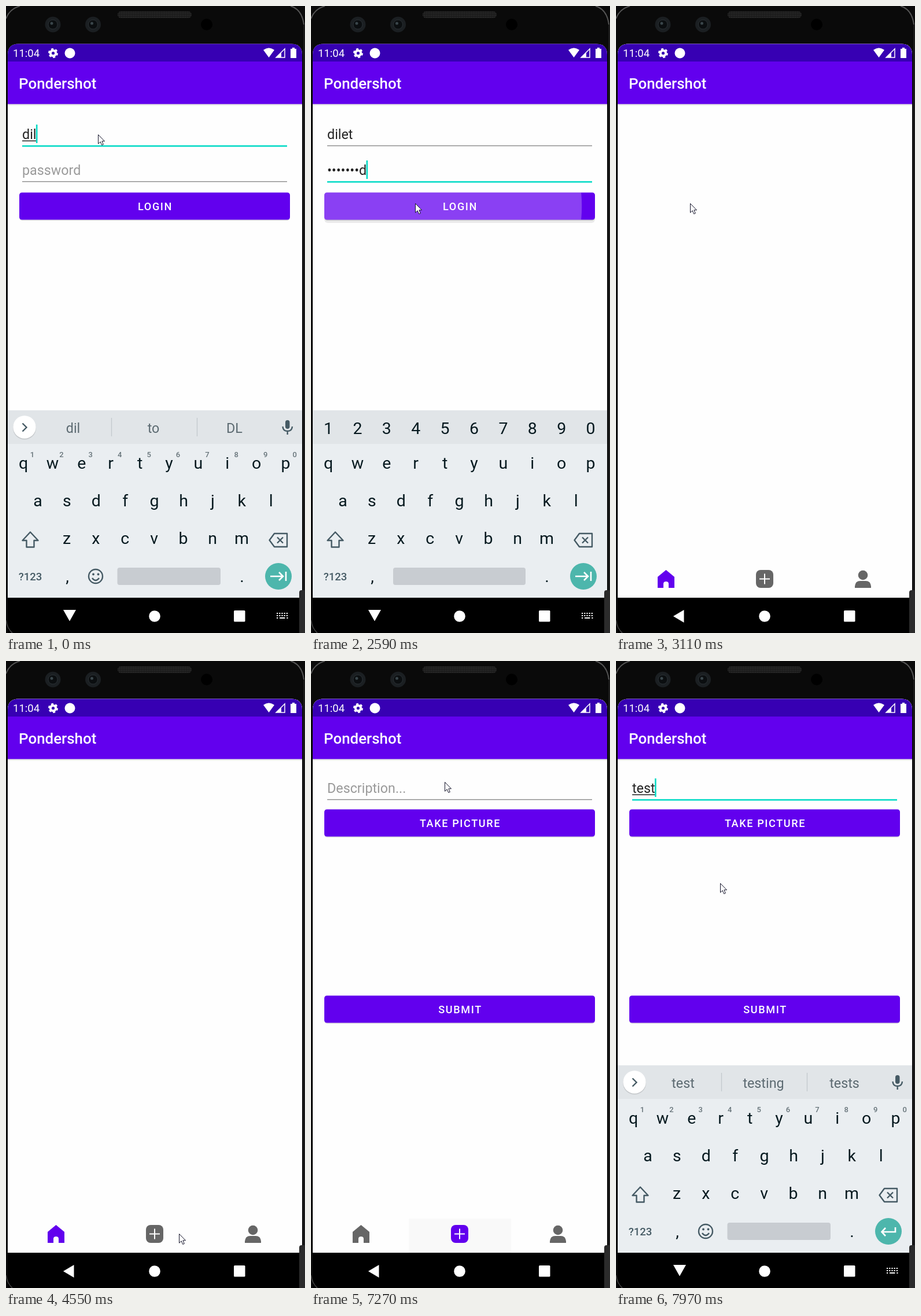
An HTML page for the animation above (8 s loop, 517 px wide and 1084 px high).

```html
<!DOCTYPE html>
<html lang="en">
<head>
<meta charset="utf-8">
<title>Phone app demo</title>
<style>
  html, body { margin: 0; width: 100%; height: 100%; overflow: hidden; background: #0a0a0a; }
  svg { display: block; width: 517px; height: 1084px; font-family: Roboto, sans-serif; }
  .mid { text-anchor: middle; }
  .btn { font-size: 18.1px; font-weight: 500; letter-spacing: 1.62px; fill: #fff; text-anchor: middle; }
  .field { font-size: 23.3px; }
  .key { font-size: 28.5px; fill: #06191f; text-anchor: middle; }
  .num { font-size: 13px; font-weight: 500; fill: #67747a; text-anchor: middle; }
  .sug { font-size: 23.3px; fill: #5c6a71; text-anchor: middle; }
  .line { fill: none; stroke: #455a64; stroke-width: 2.4; }
  .white { fill: none; stroke: #fff; stroke-width: 2.6; }
</style>
</head>
<body>
<svg viewBox="0 0 517 1084">
  <defs>
    <clipPath id="screen"><path d="M3 1084V84Q3 65.500 22 65.500H493Q512 65.500 512 84V1084Z"/></clipPath>
    <clipPath id="aboveNav"><path d="M3 65H512V1023H3Z"/></clipPath>
    <clipPath id="loginClip"><rect x="23" y="322.500" width="468" height="47" rx="4.500"/></clipPath>
    <clipPath id="tabClip"><path d="M169 964H346V1023H169Z"/></clipPath>
    <pattern id="mesh" width="3" height="3" patternUnits="userSpaceOnUse">
      <rect width="3" height="3" fill="#191919"/><circle cx="1.5" cy="1.5" r=".8" fill="#3a3a3a"/>
    </pattern>
    <linearGradient id="shade" x2="0" y2="1">
      <stop stop-color="#000" stop-opacity=".16"/><stop offset="1" stop-color="#000" stop-opacity="0"/>
    </linearGradient>
    <g id="header">
      <path d="M3 65H512V1023H3Z" fill="#fefefe"/>
      <path d="M3 169H512V173H3Z" fill="url(#shade)"/>
      <path d="M3 96H512V169.500H3Z" fill="#6200ee"/>
      <text x="22" y="143" font-size="25.9" font-weight="500" fill="#fff">Pondershot</text>
    </g>
  </defs>

  <!-- phone body -->
  <g fill="none" stroke="#555" stroke-width="2">
    <path d="M0 22Q6 5 24 0M492 0Q512 6 515 32"/>
    <path d="M515.5 32V1084" stroke="#222"/>
  </g>
  <rect x="193" y="9" width="128" height="12" rx="6" fill="url(#mesh)"/>
  <g id="cameras"></g>
  <circle cx="347" cy="32" r="10" fill="#000"/>

  <g clip-path="url(#screen)">
    <path d="M3 65H512V1084H3Z"/>
    <g clip-path="url(#aboveNav)">
      <g id="login">
        <use href="#header"/>
        <g id="user" class="field" transform="translate(28 230)"></g>
        <g id="pass" class="field" transform="translate(28 292)"></g>
        <rect id="lift" x="23" y="326" width="468" height="49" rx="6" fill="#000" opacity="0"/>
        <g id="loginButton"></g>
        <g clip-path="url(#loginClip)"><circle id="ripple" cx="182" cy="346" fill="#fff"/></g>
        <text class="btn" x="258" y="353">LOGIN</text>
      </g>
      <g id="main">
        <use href="#header"/>
        <g id="compose">
          <g id="desc" class="field" transform="translate(28 228)"></g>
          <g id="composeButtons"></g>
          <text class="btn" x="258" y="287">TAKE PICTURE</text>
          <text class="btn" x="258" y="609">SUBMIT</text>
        </g>
        <g clip-path="url(#tabClip)"><circle id="tabRipple" cx="257" cy="993"/></g>
        <path id="home" d="M86.500 975L101 987V1006H91V999Q91 995 86.500 995T82 999V1006H72V987Z"/>
        <rect id="add" x="242" y="975" width="30" height="31" rx="8"/>
        <path d="M248 990.500H266M257 981.500V999.500" stroke="#fff" stroke-width="2"/>
        <g fill="#666"><circle cx="427" cy="984" r="8.300"/><path d="M413 1006V1003Q414 994 422 994H432Q440 994 441 1003V1006Z"/></g>
      </g>
      <g id="keyboard">
        <path d="M3 699H512V1023H3Z" fill="#eaeef1"/>
        <path d="M3 699H512V757H3Z" fill="#e1e5e8"/>
        <g id="letters"></g>
        <g id="digits"></g>
        <g id="suggest">
          <circle cx="32" cy="729.500" r="20" fill="#000" opacity=".12"/>
          <circle cx="32" cy="728" r="19.700" fill="#fff"/>
          <path class="line" d="M28.500 721.500L35.500 728.500 28.500 735.500"/>
          <path d="M182.500 712V744M330.500 712V744" stroke="#c3c9cd" stroke-width="1.300"/>
          <text class="sug" x="116" y="738"></text>
          <text class="sug" x="255" y="738"></text>
          <text class="sug" x="395" y="738"></text>
          <rect x="483" y="716" width="7.500" height="15" rx="3.700" fill="#455a64"/>
          <path class="line" d="M478.500 727Q479 735 486.700 735T495 727M486.700 735V741"/>
          <g id="hints"></g>
        </g>
        <path class="line" d="M42 909.500L28.500 924H35.500V935.500H48.500V924H55.500Z" stroke-linejoin="round"/>
        <path class="line" d="M455.500 923.500L464 912H486V935H464ZM469 918.500L479 928.500M479 918.500L469 928.500" stroke-linejoin="round"/>
        <text class="mid" x="42" y="993" font-size="18.500" font-weight="500" fill="#455a64">?123</text>
        <text class="key" x="106" y="996">,</text>
        <text class="key" x="408" y="996">.</text>
        <g id="emoji">
          <circle class="line" cx="155" cy="986" r="12"/>
          <path class="line" d="M149 989Q155 997 161 989"/>
          <circle cx="151" cy="982.500" r="1.900" fill="#455a64"/><circle cx="159.500" cy="982.500" r="1.900" fill="#455a64"/>
        </g>
        <rect id="space" y="971" height="30" rx="4" fill="#c8ccd1"/>
        <circle cx="471" cy="986" r="23" fill="#4db6ac"/>
        <path id="action" class="white"/>
      </g>
    </g>

    <!-- system bars -->
    <path d="M3 65H512V96H3Z" fill="#3700b3"/>
    <g fill="#fff">
      <text x="12" y="88" font-size="18.500">11:04</text>
      <circle cx="81.500" cy="81.500" r="4.600" fill="none" stroke="#fff" stroke-width="4"/>
      <circle cx="81.500" cy="81.500" r="7.200" fill="none" stroke="#fff" stroke-width="2.600" stroke-dasharray="4 3.540"/>
      <circle cx="110.500" cy="81.500" r="9"/>
      <path d="M445 76Q454.500 69 464 76L454.500 89Z"/>
      <path d="M467 89L482 74V89Z" fill="none" stroke="#fff" stroke-width="1.500"/><path d="M467 89L476 80V89Z"/>
      <path d="M492 74H495V72H499V74H502V90H492Z"/>
      <path id="back"/>
      <circle cx="257" cy="1055" r="9.800"/>
      <rect x="394" y="1045" width="19.500" height="19.500" rx="1.500"/>
      <g id="imeIcon" fill="none" stroke="#fff" stroke-width="2.200">
        <path stroke-dasharray="2.200 2" d="M468 1050H487.500M468 1054H487.500"/>
        <path d="M468 1058H470.200M473 1058H482.500M485.300 1058H487.500"/>
      </g>
    </g>
  </g>
  <path d="M517 1010H511Q507 1010 507 1014V1084H517Z" fill="#2b2b2b"/>
  <path d="M0 1062Q2 1076 11 1084" fill="none" stroke="#444" stroke-width="1.500"/>
  <path id="pointer" d="M.5.5V16.200L4.200 12.800 6.700 18.500 9.300 17.400 6.900 11.800H11.500Z" fill="#fff" stroke="#15152b"/>
</svg>
<script>
const $ = id => document.getElementById(id);
const set = (el, attrs) => { for (const k in attrs) el.setAttribute(k, attrs[k]); };
const show = (id, on) => set($(id), { display: on ? 'inline' : 'none' });
const ramp = (t, a, b) => Math.min(1, Math.max(0, (t - a) / (b - a)));
const easeOut = p => 1 - (1 - p) ** 2;
const smooth = p => p * p * (3 - 2 * p);
const latest = (list, t) => list.filter(e => e[0] <= t).pop();
const typed = (word, times, t) => word.slice(0, times.filter(s => s <= t).length);

// Static parts
const row = (chars, x, y, cls = 'key') => [...chars].map((c, i) =>
  `<text class="${cls}" x="${x + 50.4 * i}" y="${y}">${c}</text>`).join('');
const button = y => `<rect x="23" y="${y + 2}" width="468" height="47" rx="5" fill="#000" opacity=".13"/>
  <rect x="23" y="${y + 0.5}" width="468" height="47" rx="4.500" fill="#6200ee"/>`;
$('letters').innerHTML = row('qwertyuiop', 30, 800) + row('asdfghjkl', 55, 865) + row('zxcvbnm', 105, 930);
$('digits').innerHTML = row('1234567890', 30, 740);
$('hints').innerHTML = row('1234567890', 45.5, 780, 'num');
$('loginButton').innerHTML = button(322);
$('composeButtons').innerHTML = button(256) + button(578);
$('cameras').innerHTML = [81, 150.5].map(x => `<circle cx="${x}" cy="32" r="13.500" fill="#1b1f22"/>
  <circle cx="${x}" cy="32" r="8" fill="#0b0e10" stroke="#2b3135"/><circle cx="${x - 2}" cy="30" r="2.500" fill="#39454a"/>`).join('');

for (const id of ['user', 'pass', 'desc'])
  $(id).innerHTML = '<text/><rect class="under" y="2.500" height="1.500" fill="#222"/><rect class="base" width="458"/><rect class="caret" y="-25" width="2.600" height="32" fill="#03dac5"/>';

function field(id, text, hint, focused, composing) {
  const [label, under, base, caret] = $(id).children;
  label.textContent = text || hint;
  set(label, { fill: text ? '#222' : '#9a9a9a' });
  const width = text ? label.getComputedTextLength() : 0;
  set(under, { width: composing ? width : 0 });
  set(base, focused ? { y: 10.8, height: 2.6, fill: '#03dac5' } : { y: 10.9, height: 1.4, fill: '#8a8a8a' });
  set(caret, { x: width - 0.6, opacity: +focused });
}

// Timeline: [ms, ...values]
const path = [
  [0, 159, 222], [1970, 159, 222], [2330, 180, 341], [2820, 180, 341], [2980, 128, 341],
  [3330, 128, 341], [3490, 270, 614], [3800, 270, 614], [3860, 273, 614], [4140, 273, 614],
  [4360, 376, 850], [4550, 299, 990], [4670, 299, 990], [4920, 281, 987], [5100, 281, 987],
  [5250, 278, 987], [5460, 278, 987], [5560, 274, 992], [6290, 274, 992], [6500, 350, 985],
  [6740, 416, 690], [7120, 257, 206], [7240, 231, 209], [7570, 231, 209], [7850, 180, 384], [8000, 180, 384]
];
const passTimes = [700, 790, 880, 1060, 1270, 1450, 1550, 1660];
const testTimes = [7770, 7830, 7890, 7940];
const suggestions = [
  [0, 'dil', 'to', 'DL'], [90, 'dile', 'dike', 'dime'], [150, 'dilet', 'Dilet', 'dilets'],
  [7570, '', '', ''], [7770, 't', 'the', 'to'], [7830, 'te', 'the', 'tell'],
  [7890, 'tes', 'yes', 'test'], [7970, 'test', 'testing', 'tests']
];

function movePointer(t) {
  const i = Math.max(1, path.findIndex(p => p[0] > t));
  const [a, x, y] = path[i - 1], [b, x2, y2] = path[i];
  const p = smooth(ramp(t, a, b));
  set($('pointer'), { transform: `translate(${Math.round(x + (x2 - x) * p)} ${Math.round(y + (y2 - y) * p)})` });
}

function draw(t) {
  movePointer(t);

  // Login screen
  const onPass = t >= 460;
  field('user', 'dilet'.slice(0, t < 60 ? 3 : t < 120 ? 4 : 5), 'username', !onPass, !onPass);
  const secret = typed('password', passTimes, t);
  field('pass', secret && '•'.repeat(secret.length - 1) + secret.at(-1), 'password', onPass, false);
  const press = ramp(t, 2420, 2660), release = ramp(t, 2640, 2790);
  set($('ripple'), { r: 312 * easeOut(press), opacity: 0.25 * (1 - release) });
  set($('lift'), { opacity: 0.08 * ramp(t, 2420, 2480) * (1 - release) });

  // Main screen
  const enter = easeOut(ramp(t, 2800, 3110));
  set($('main'), { opacity: enter, transform: `translate(0 ${42 * (1 - enter)})` });
  const composing = t >= 5700;
  show('compose', composing);
  set($('home'), { fill: composing ? '#666' : '#6200ee' });
  set($('add'), { fill: composing ? '#6200ee' : '#666' });
  const fade = ramp(t, 5680, 5780);
  set($('tabRipple'), { r: 100 * easeOut(ramp(t, 5570, 5720)), opacity: 0.07 - 0.05 * fade });
  const text = typed('test', testTimes, t);
  field('desc', text, 'Description...', t >= 7360, true);

  // Keyboard
  const open = t < 3000 || t >= 7570;
  const hidden = t < 5000 ? ramp(t, 2820, 3000) : 1 - easeOut(ramp(t, 7540, 7750));
  show('keyboard', open);
  set($('keyboard'), { transform: `translate(0 ${324 * hidden})` });
  const secure = onPass && t < 5000;
  show('digits', secure);
  show('suggest', !secure);
  show('emoji', !secure);
  set($('space'), secure ? { x: 142, width: 229 } : { x: 192.5, width: 178.5 });
  set($('action'), { d: t < 5000
    ? 'M457 986H479M472 979L479 986 472 993M484 978V994'
    : 'M483 979V987H460M466 980L459.500 987 466 994' });
  const words = latest(suggestions, t).slice(1);
  $('suggest').querySelectorAll('.sug').forEach((el, i) => el.textContent = words[i]);
  set($('back'), { d: open ? 'M99 1044H121L110 1063.500Z' : 'M99 1055L117.500 1044V1066Z' });
  show('imeIcon', open);
}

const start = performance.now();
function tick() {
  draw((performance.now() - start) % 8000);
  requestAnimationFrame(tick);
}
tick();
</script>
</body>
</html>
```
